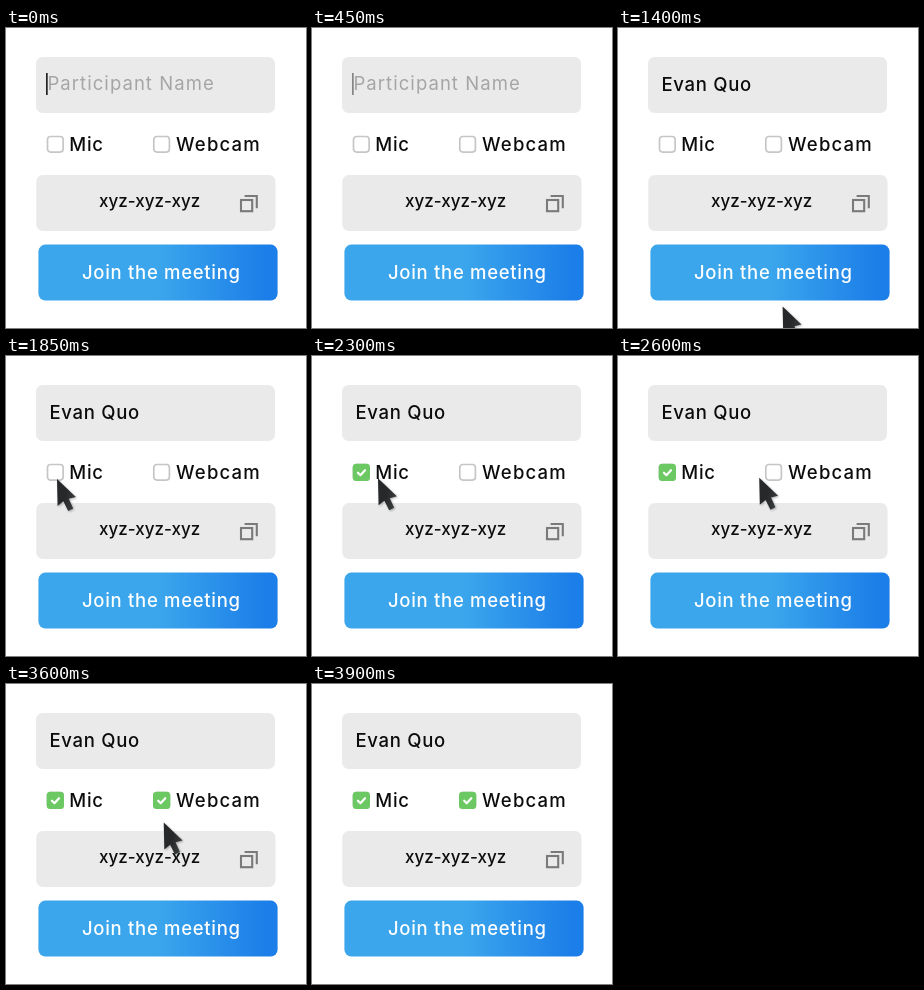
Recreate the animation shown at these times as an HTML page. Size 300x300 px, loop 4650 ms.

```html
<!DOCTYPE html>
<html lang="en">
<head>
<meta charset="utf-8">
<title>Join the meeting</title>
<style>
  html, body { margin: 0; width: 100%; height: 100%; overflow: hidden; background: #fff; }
  svg { display: block; width: 100vw; height: 100vh; }
  text { font: 450 18.5px Inter, "Open Sans", sans-serif; letter-spacing: .7px; fill: #0c0c0c; white-space: pre; }
  .hint { font-weight: 400; letter-spacing: 1.05px; fill: #a5a5a5; }
  .wide { letter-spacing: 1.2px; }
  .code { font-size: 17px; letter-spacing: 0; }
  .join { fill: #fff; }
  .field { fill: #eaeaea; }
  .empty { fill: #fff; stroke: #c6c6c6; stroke-width: 1.7; }
  .on rect { fill: #6cc863; }
  .on path { fill: none; stroke: #fff; stroke-width: 2.2; stroke-linecap: round; stroke-linejoin: round; }
  #pointer { filter: drop-shadow(1px 1px 1px rgba(0, 0, 0, .3)); }
</style>
</head>
<body>
<svg viewBox="0 0 300 300">
  <defs>
    <linearGradient id="blue">
      <stop offset=".5" stop-color="#3ba6ec"/>
      <stop offset=".95" stop-color="#1c7ee8"/>
    </linearGradient>
    <linearGradient id="dark" x1="0" y1=".3" x2="1" y2=".7">
      <stop offset=".45" stop-color="#262829"/>
      <stop offset="1" stop-color="#3c3f40"/>
    </linearGradient>
    <g id="box"><rect class="empty" x="1.2" y="1.2" width="15.6" height="15.6" rx="3"/></g>
    <g id="tick" class="on">
      <rect width="17.3" height="17.3" rx="3.5"/>
      <path d="M5.2 9l2.5 2.5 4.6-5"/>
    </g>
  </defs>

  <rect class="field" x="30" y="29" width="239" height="56" rx="6.5"/>
  <text id="hint" class="hint" x="41.5" y="62">Participant Name</text>
  <rect id="caret" x="40" y="45" width="1.7" height="22" fill="#222"/>
  <text id="name" x="43.5" y="62.5"></text>

  <use href="#box" x="40.3" y="107.3"/>
  <use href="#box" x="146.6" y="107.3"/>
  <use id="mic" href="#tick" x="40.7" y="107.7"/>
  <use id="cam" href="#tick" x="147" y="107.7"/>
  <text x="63.3" y="122.5">Mic</text>
  <text class="wide" x="170" y="123">Webcam</text>

  <rect class="field" x="30.3" y="147" width="239.2" height="56" rx="6.5"/>
  <text class="code" x="93" y="179">xyz-xyz-xyz</text>
  <g fill="none" stroke="#7a7a7a" stroke-width="2.1">
    <rect x="235" y="172" width="11.2" height="11.2"/>
    <path d="M238.6 168H250.8V180.3"/>
  </g>

  <rect x="32.4" y="216.6" width="239.2" height="56" rx="7" fill="url(#blue)"/>
  <text class="join" x="76" y="250.5">Join the meeting</text>

  <path id="pointer" fill="url(#dark)" d="M.6 .5L1.2 27.5L7 22.8L11.8 32.5L16.8 30L12.4 20.3L19.5 18.5Z"/>
</svg>
<script>
const LOOP = 4650, STEP = 50, FULL_NAME = "Evan Quo";
const el = id => document.getElementById(id);
const [hint, caret, name, mic, cam, pointer] =
  ["hint", "caret", "name", "mic", "cam", "pointer"].map(el);

const letters = [...FULL_NAME].map(ch => {
  const span = document.createElementNS("http://www.w3.org/2000/svg", "tspan");
  span.textContent = ch;
  return name.appendChild(span);
});

const progress = (t, start, length) => Math.min(1, Math.max(0, (t - start) / length));
const mix = (a, b, p) => a + (b - a) * p;

// cubic-bezier(.72, 0, .28, 1), solved by bisection
function ease(x) {
  let lo = 0, hi = 1, s = .5;
  for (let i = 0; i < 24; i++) {
    s = (lo + hi) / 2;
    const at = 3 * (1 - s) ** 2 * s * .72 + 3 * (1 - s) * s * s * .28 + s ** 3;
    if (at < x) lo = s; else hi = s;
  }
  return s * s * (3 - 2 * s);
}

// Two eased glides, then an accelerating exit
function pointerAt(t) {
  if (t < 1950) {
    const p = ease(progress(t, 900, 1000));
    return [mix(278, 50, p), mix(434, 122, p)];
  }
  if (t <= 3550) {
    const p = ease(progress(t, 1950, 1000));
    return [mix(50, 156, p), mix(122, 121, p)];
  }
  const drop = 17 * ((t - 3550) / STEP) ** 1.3;
  return [156 + drop / 15, 121 + drop];
}

function render(t) {
  const fade = 1 - progress(t, 560, 280);
  hint.style.opacity = fade;
  caret.style.opacity = fade * (.5 + .5 * Math.cos(t / 600 * 2 * Math.PI));
  letters.forEach((span, i) => {
    span.style.fillOpacity = progress(t, 860 + 17 * i, 220);
  });
  mic.style.visibility = t >= 1900 ? "visible" : "hidden";
  cam.style.visibility = t >= 2950 ? "visible" : "hidden";
  const [x, y] = pointerAt(t);
  pointer.setAttribute("transform", `translate(${x.toFixed(2)} ${y.toFixed(2)})`);
}

let start;
function tick(now) {
  start ??= now;
  render(Math.floor(((now - start) % LOOP) / STEP) * STEP);
  requestAnimationFrame(tick);
}
render(0);
requestAnimationFrame(tick);
</script>
</body>
</html>
```
